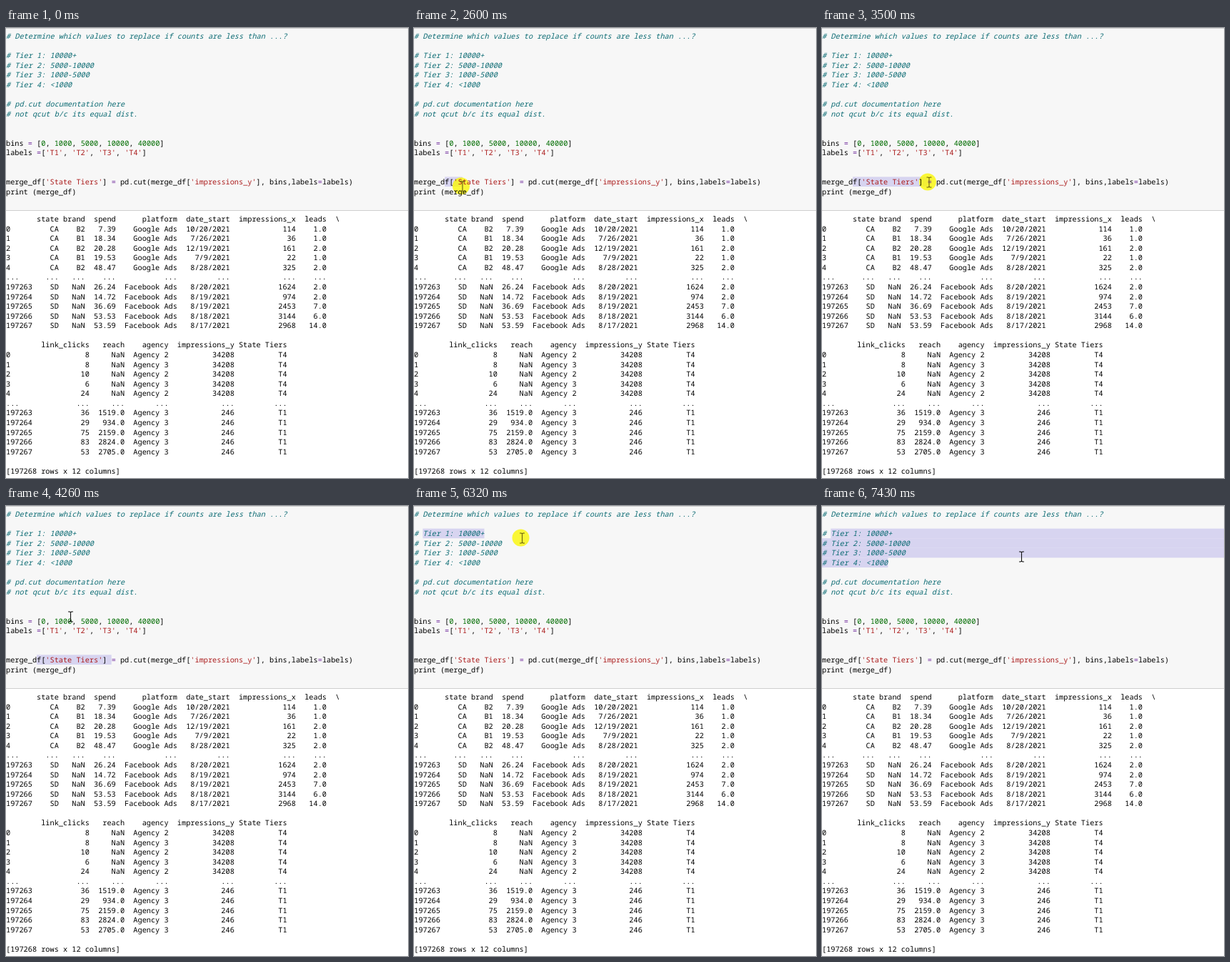
Write an HTML page that moves like this. It is 563 px wide and 630 px high and loops after 8000 ms.

```html
<!DOCTYPE html>
<html lang="en">
<head>
<meta charset="utf-8">
<title>Binning a data frame</title>
<style>
  html, body { margin: 0; width: 100%; height: 100%; overflow: hidden; background: #fff; }
  svg { display: block; width: 563px; height: 630px; }
  text {
    font: 10.258px "Noto Sans Mono", "DejaVu Sans Mono", monospace;
    white-space: pre; text-rendering: geometricPrecision; fill: #000;
  }
  .comment { fill: #0d6c74; font-style: italic; }
  .string { fill: #ab1c1c; }
  .number { fill: #006c00; }
  .operator { fill: #6f2a9c; }
  .select { fill: #d7d4f0; }
  #cursor { fill: none; stroke: #111; stroke-width: 1.1; }
  .pressed #cursor { stroke: #665f10; }
</style>
</head>
<body>
<svg id="stage" viewBox="0 0 563 630">
  <rect width="563" height="256" fill="#f7f7f7"/>
  <path d="M0 .5H563M0 255.5H563" stroke="#cfcfcf"/>
  <g id="selection"></g>
  <circle id="press" r="12" fill="#fbf700" opacity=".78"/>
  <g id="text"></g>
  <path id="cursor" d="M-3.5 -7H-1.2L0 -6L1.2 -7H3.5M0 -6V6M-3.5 7H-1.2L0 6L1.2 7H3.5"/>
</svg>
<script>
const LOOP = 8000, STEP = 70, WIDTH = 563, CHAR = 6.155, LINE = 13.6, TOP = 4.7;
const $ = id => document.getElementById(id);

function add(parent, tag, attrs, content) {
  const node = document.createElementNS("http://www.w3.org/2000/svg", tag);
  for (const name in attrs) node.setAttribute(name, attrs[name]);
  if (content !== undefined) node.textContent = content;
  parent.append(node);
  return node;
}

const code = `# Determine which values to replace if counts are less than ...?

# Tier 1: 10000+
# Tier 2: 5000-10000
# Tier 3: 1000-5000
# Tier 4: <1000

# pd.cut documentation here
# not qcut b/c its equal dist.


bins = [0, 1000, 5000, 10000, 40000]
labels =['T1', 'T2', 'T3', 'T4']


merge_df['State Tiers'] = pd.cut(merge_df['impressions_y'], bins,labels=labels)
print (merge_df)`.split("\n");

const TOKEN = /(#.*)|('[^']*')|(\b\d+\b)|(=)|[^#'=\d]+|./g;
const KINDS = ["comment", "string", "number", "operator"];

code.forEach((line, i) => {
  const row = add($("text"), "text", { x: 0, y: Math.round(TOP + 10.2 + LINE * i) });
  for (const match of line.matchAll(TOKEN)) {
    const kind = KINDS[match.slice(1).findIndex(Boolean)];
    add(row, "tspan", kind ? { class: kind } : {}, match[0]);
  }
});

// A column shows five head and five tail values; short lists repeat.
const ROWS = 197268, SHOWN = 5;
const fill = make => Array.from({ length: SHOWN }, (_, i) => make(i));

function column(width, name, head, tail) {
  const cycle = list => { const v = list.split(","); return fill(i => v[i % v.length]); };
  return [name, ...cycle(head), "...", ...cycle(tail)].map(s => s.padStart(width));
}

const index = ["", ...fill(i => i), "...", ...fill(i => ROWS - SHOWN + i)]
  .map(s => String(s).padEnd(6));

const table = columns => index.map((s, i) => s + columns.map(c => c[i]).join(""));

const first = table([
  column(6, "state", "CA", "SD"),
  column(6, "brand", "B2,B1", "NaN"),
  column(7, "spend", "7.39,18.34,20.28,19.53,48.47", "26.24,14.72,36.69,53.53,53.59"),
  column(14, "platform", "Google Ads", "Facebook Ads"),
  column(12, "date_start", "10/20/2021,7/26/2021,12/19/2021,7/9/2021,8/28/2021",
    "8/20/2021,8/19/2021,8/19/2021,8/18/2021,8/17/2021"),
  column(15, "impressions_x", "114,36,161,22,325", "1624,974,2453,3144,2968"),
  column(7, "leads", "1.0,1.0,2.0,1.0,2.0", "2.0,2.0,7.0,6.0,14.0")
]);
first[0] += "  \\";

const second = table([
  column(13, "link_clicks", "8,8,10,6,24", "36,29,75,83,53"),
  column(8, "reach", "NaN", "1519.0,934.0,2159.0,2824.0,2705.0"),
  column(10, "agency", "Agency 2,Agency 3", "Agency 3"),
  column(15, "impressions_y", "34208", "246"),
  column(12, "State Tiers", "T4", "T1")
]);

[...first, "", ...second, "", `[${ROWS} rows x 12 columns]`].forEach((line, i) =>
  add($("text"), "text", { x: 0, y: Math.round(271 + 13.57 * i) }, line));

// Pointer moves: start time, number of steps, destination, sideways bulge.
const ENTRY = [534, 624];
const moves = [
  [400, 12, 301.5, 252],
  [1240, 4, 226.5, 223],
  [1510, 7, 70, 209],
  [2130, 2, 45.5, 219],
  [2530, 9, 146.5, 231],
  [3160, 6, 150, 216],
  [3850, 7, 90.5, 155],
  [4330, 4, 160.5, 90, 65],
  [4670, 6, 3, 40],
  [5360, 5, 13.5, 37],
  [6040, 5, 151.5, 45],
  [6390, 5, 174, 79],
  [7080, 6, 279.5, 71]
];
const drags = [
  { from: 2530, to: 3850, row: 15, col: 7 },
  { from: 6040, to: 7080, row: 2, col: 2 }
];

// The pointer jumps once per step; a little slack absorbs timer rounding.
function pointer(t) {
  let [x, y] = ENTRY;
  for (const [start, steps, toX, toY, bulge = 0] of moves) {
    if (t < start) break;
    const u = Math.min(1, (Math.floor((t - start + 10) / STEP) + 1) / steps);
    x += (toX - x) * u + bulge * 4 * u * (1 - u);
    y += (toY - y) * u;
  }
  return [x, y];
}

function drawSelection(drag, t) {
  $("selection").replaceChildren();
  if (!drag) return;
  const [x, y] = pointer(Math.min(t, drag.to - 1));
  const row = Math.max(drag.row, Math.floor((y - TOP) / LINE));
  const col = Math.min(code[row].length, Math.round(x / CHAR));
  for (let r = drag.row; r <= row; r++) {
    const left = r === drag.row ? drag.col * CHAR : 0;
    const right = r === row ? col * CHAR : WIDTH;
    add($("selection"), "rect", {
      class: "select", x: left, y: TOP + LINE * r - .3,
      width: Math.max(0, right - left), height: LINE + .05
    });
  }
}

function draw(t) {
  const drag = drags.filter(d => t >= d.from).pop();
  const pressed = Boolean(drag) && t < drag.to;
  const [x, y] = pointer(t);
  $("stage").classList.toggle("pressed", pressed);
  $("press").style.display = pressed ? "" : "none";
  $("press").setAttribute("cx", x - 2);
  $("press").setAttribute("cy", y - .5);
  $("cursor").style.display = t >= moves[0][0] ? "" : "none";
  $("cursor").setAttribute("transform", `translate(${x} ${y})`);
  drawSelection(drag, t);
}

const begin = performance.now();
function tick() {
  draw((performance.now() - begin) % LOOP);
  requestAnimationFrame(tick);
}
tick();
</script>
</body>
</html>
```
